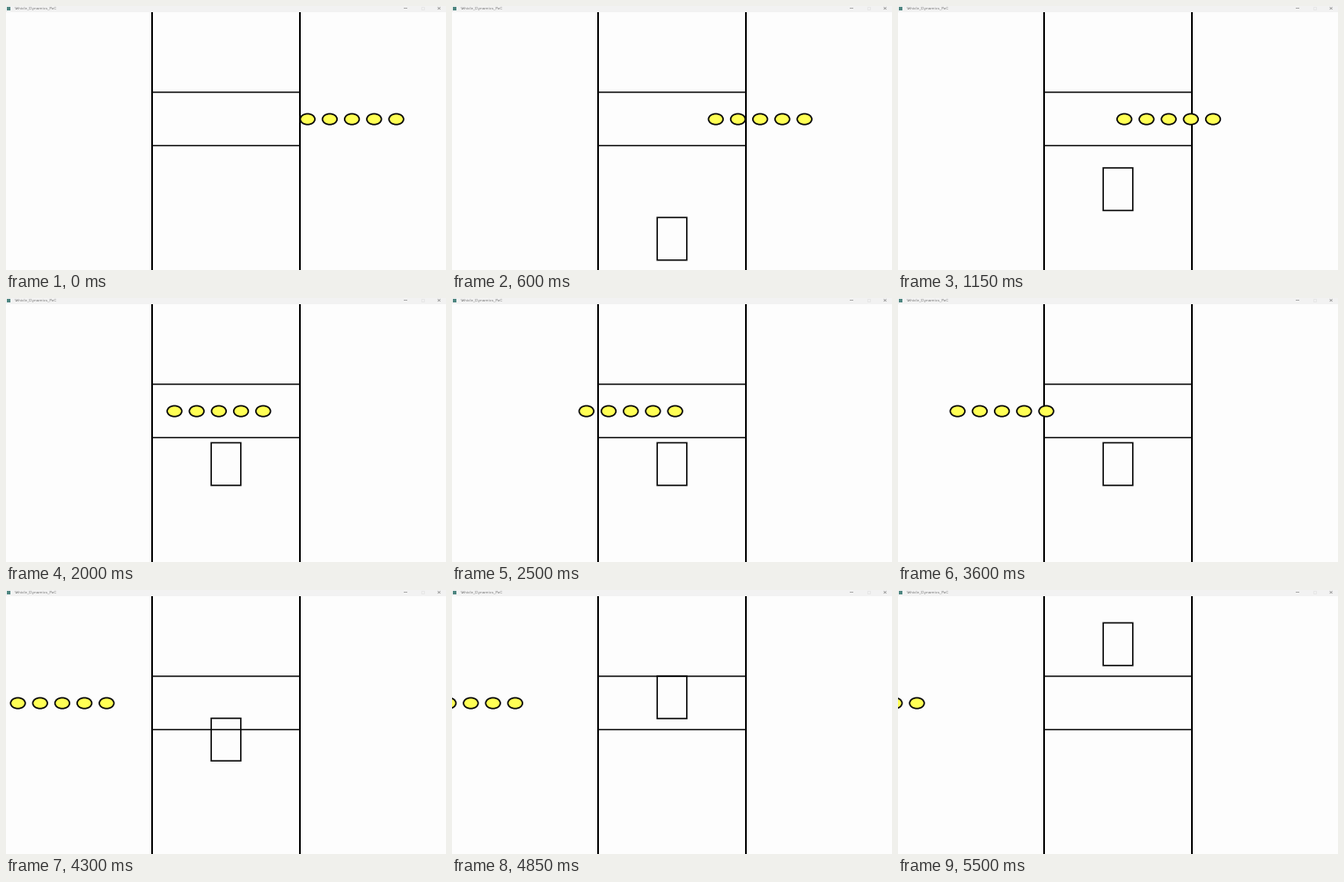
Recreate the animation shown at these times as a matplotlib script. Size 500 by 300 pixels, loop 5550 ms.

```python
import matplotlib.pyplot as plt
from matplotlib.animation import FuncAnimation
from matplotlib.patches import Ellipse, Rectangle

W, H, DPI = 500, 300, 100
FRAMES, STEP_MS = 111, 50
PX = 72 / DPI
INK, PAPER, BAR, GREY = "#080808", "#fdfdfd", "#f2f2f2", "#8c8c8c"

ROAD = (166, 334)
CROSSING = (98, 158.6)
DOT_X, DOT_Y, DOT_GAP, DOT_SPEED = 342.7, 128.6, 25.2, 3.868
CAR_STOP, CAR_W, CAR_H = 164.5, 33.6, 48.4
BRAKE_END, BRAKE = 34.3, 0.305
START, RAMP, CRUISE = 74.7, 15.8, 4.64

fig = plt.figure(figsize=(W / DPI, H / DPI), dpi=DPI, facecolor=PAPER)
ax = fig.add_axes([0, 0, 1, 1])
ax.set_xlim(0, W)
ax.set_ylim(H, 0)
ax.axis("off")


def line(xs, ys, width, color=INK, z=2):
    ax.plot(xs, ys, color=color, lw=width * PX, solid_capstyle="butt",
            snap=False, zorder=z)


def block(x, y, w, h, color, z=5):
    ax.add_patch(Rectangle((x, y), w, h, fc=color, ec="none", zorder=z))


def title_bar():
    block(0, 0, W, 7, BAR)
    block(1, 1, 4, 4, "#4d8580", 6)
    ax.text(10, 4.1, "Vehicle_Dynamics_PoC", family="DejaVu Sans",
            size=4.2 * PX, color="#777777", va="baseline", zorder=6)
    line((452, 456), (2.6, 2.6), 0.7, GREY, 6)
    ax.add_patch(Rectangle((471.5, 1.4), 3, 2.4, fill=False, ec="#dddddd",
                           lw=0.5 * PX, zorder=6))
    line((490.6, 493.6), (1.3, 3.9), 0.7, GREY, 6)
    line((490.6, 493.6), (3.9, 1.3), 0.7, GREY, 6)


def car_top(n):
    """Brake to a stop, wait, then speed up to cruising pace."""
    if n < BRAKE_END:
        return CAR_STOP + BRAKE / 2 * (BRAKE_END - n) ** 2
    t = max(0, n - START)
    if t < RAMP:
        return CAR_STOP - CRUISE * t * t / (2 * RAMP)
    return CAR_STOP - CRUISE * (t - RAMP / 2)


title_bar()
for x in ROAD:
    line((x, x), (7, H), 2)
for y in CROSSING:
    line(ROAD, (y, y), 1.5)

car = Rectangle((233.2, H), CAR_W, CAR_H, fill=False, ec=INK, lw=1.6 * PX,
                snap=False, zorder=3)
ax.add_patch(car)
dots = [Ellipse((0, DOT_Y), 16.6, 12.2, fc="#ffff55", ec=INK, lw=1.7 * PX,
                zorder=4) for _ in range(5)]
for dot in dots:
    ax.add_patch(dot)


def draw(n):
    car.set_y(car_top(n))
    lead = DOT_X - DOT_SPEED * max(0, n - 0.9)
    for i, dot in enumerate(dots):
        dot.set_center((lead + i * DOT_GAP, DOT_Y))
    return [car, *dots]


anim = FuncAnimation(fig, draw, frames=FRAMES, interval=STEP_MS,
                     repeat=True, repeat_delay=0, blit=False)
plt.show()
```
